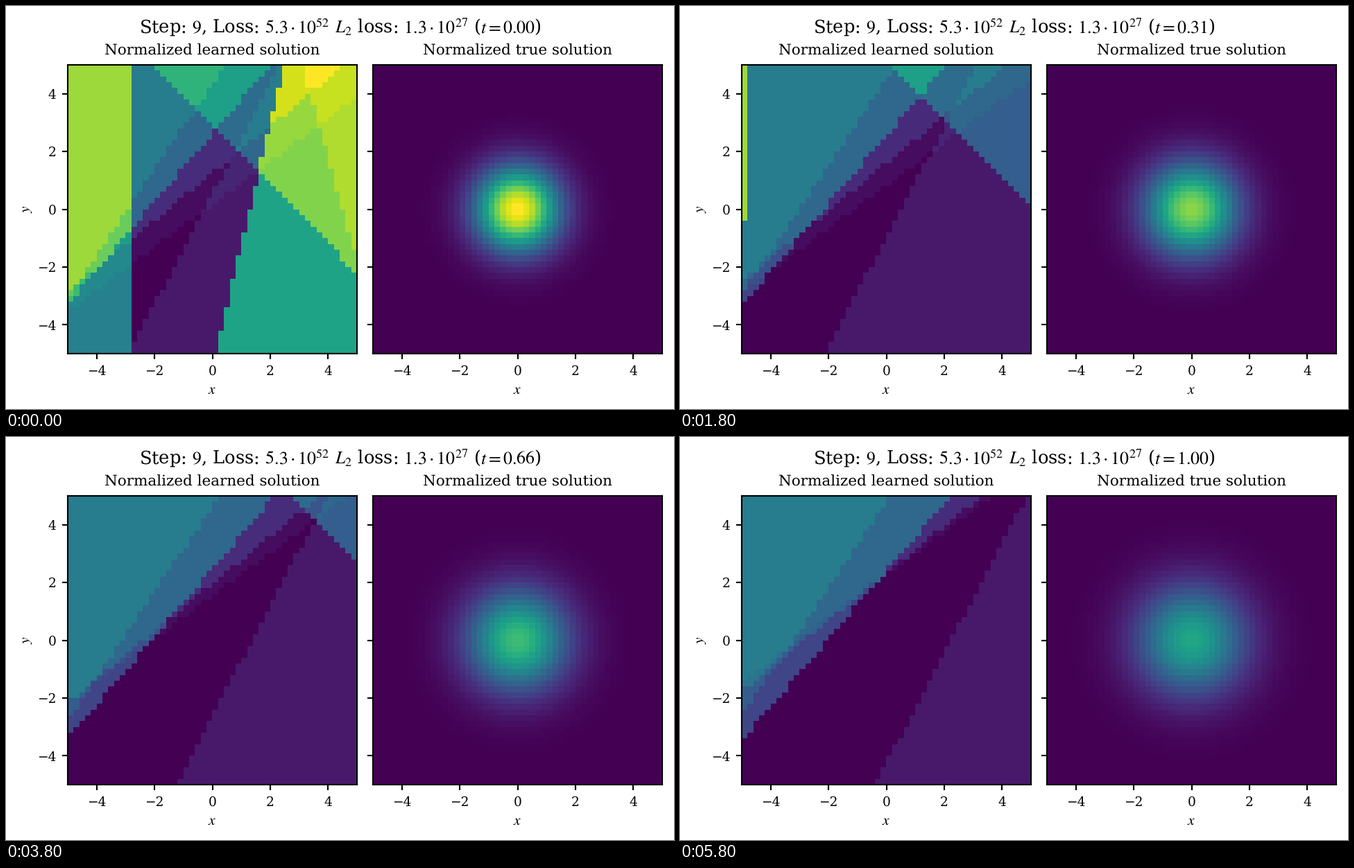
Animation of 963 by 582 pixels, one loop 6000 ms. Source, as a matplotlib script:

```python
import numpy as np
import matplotlib.pyplot as plt
from matplotlib.animation import FuncAnimation

W, H, DPI = 963, 582, 192
SIDE, BOTTOM = 417, 502
FRAMES = 30

plt.rcParams.update({
    "font.family": "DejaVu Serif",
    "font.size": 8.05,
    "mathtext.fontset": "stix",
    "text.hinting": "none",
    "axes.linewidth": 0.8,
})

cells = -5 + 0.2 * (np.arange(50) + 0.5)
X, Y = np.meshgrid(cells, cells)


def above(slope, height):
    return Y > slope * X + height


def right_of(lean, offset):
    return X > lean * Y + offset


def learned(t):
    """Sum of step units whose straight edges drift steadily with time."""
    z = 0.435 * ~right_of(0.0185, -2.793 - 6.766 * t)
    z += 0.51 * right_of(0.238, 1.29 + 25.1 * t)
    z += 0.07 * right_of(-0.28, 4.49 + 12.4 * t)
    z += 0.07 * right_of(0.525, -0.275 + 2.51 * t)
    z += 0.23 * above(-1.015, 2.865 + 7.45 * t)
    z += 0.21 * above(1.175, 2.61 - 0.21 * t)
    z += 0.085 * above(1.48, 4.33 + 0.45 * t)
    z += 0.09 * above(0.82, 1.25 + 1.07 * t)
    z += 0.035 * above(0.74, 0.17 + 2.1 * t)
    return z


def true(t):
    """Spreading heat kernel, scaled to a peak of one at the start."""
    spread = 1 + 0.7 * t
    return np.exp(-(X**2 + Y**2 - 0.02) / (2 * spread)) / spread


def heading(t):
    return (r"Step: $9$, Loss: $5.3\cdot10^{52}$ $L_2$ loss: "
            rf"$1.3\cdot10^{{27}}$ ($t={t:.2f}$)")


fig = plt.figure(figsize=(W / DPI, H / DPI), dpi=DPI, facecolor="white")


def label(x, y, text, va="center", **style):
    return fig.text(x / W, 1 - y / H, text, ha="center", va=va, **style)


def panel(left, title, data):
    ax = fig.add_axes([left / W, 1 - BOTTOM / H, SIDE / W, SIDE / H])
    image = ax.imshow(data, origin="lower", extent=(-5, 5, -5, 5),
                      cmap="viridis", vmin=0, vmax=1,
                      interpolation="nearest", aspect="auto")
    ax.set_xticks(range(-4, 5, 2))
    ax.set_yticks(range(-4, 5, 2))
    ax.tick_params(labelsize=7, length=3.1, width=0.8, pad=3.1)
    ax.set_title(title, fontsize="medium", pad=5.5)
    label(left + SIDE / 2, 554, "$x$")
    return ax, image


_, left_image = panel(89, "Normalized learned solution", learned(0))
right_ax, right_image = panel(529, "Normalized true solution", true(0))
right_ax.tick_params(labelleft=False)
label(30, 293, "$y$", rotation=90)
header = label(W / 2, 39.5, heading(0), va="baseline", fontsize="large")


def update(i):
    t = i / (FRAMES - 1)
    left_image.set_data(learned(t))
    right_image.set_data(true(t))
    header.set_text(heading(t))
    return left_image, right_image, header


anim = FuncAnimation(fig, update, frames=FRAMES, interval=200,
                     repeat=True, repeat_delay=0, blit=False)
plt.show()
```
